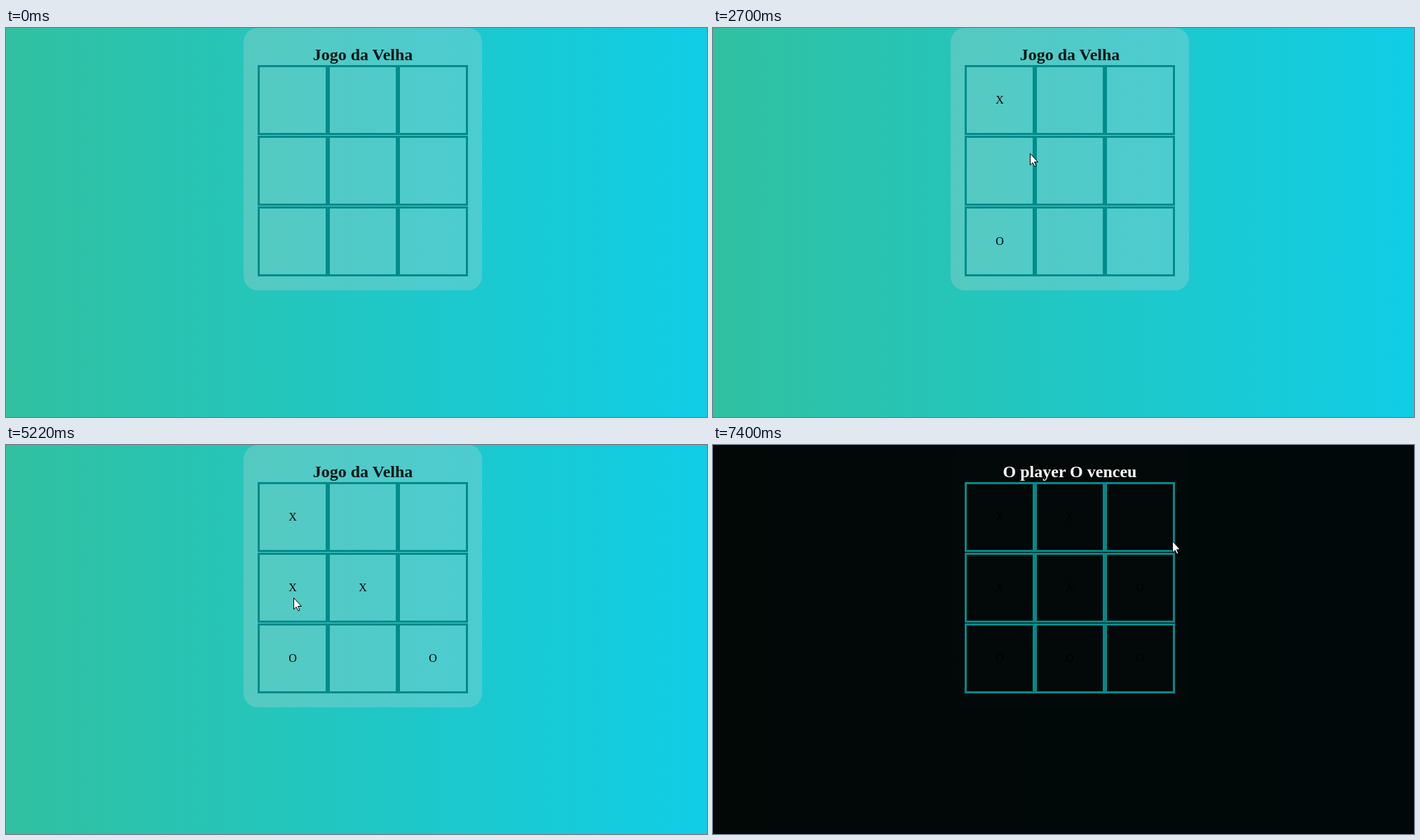
An HTML page for the animation above (8000 ms loop, 1000 px wide and 556 px high).

```html
<!DOCTYPE html>
<html lang="pt">
<head>
<meta charset="utf-8">
<title>Jogo da Velha</title>
<style>
  html, body { margin: 0; height: 100%; overflow: hidden; }
  svg { display: block; width: 100vw; height: 100vh; }
  text { font-family: "Liberation Serif", "Times New Roman", serif; font-size: 16px; text-anchor: middle; }
  #title { font-size: 24px; font-weight: bold; }
  .cell { fill: none; stroke: #008b8b; stroke-width: 3; }
</style>
</head>
<body>
<svg viewBox="0 0 1000 556" preserveAspectRatio="none">
  <defs>
    <linearGradient id="sky">
      <stop offset="0" stop-color="#31c1a1"/>
      <stop offset="1" stop-color="#10cde6"/>
    </linearGradient>
  </defs>
  <rect width="1000" height="556" fill="url(#sky)"/>
  <rect x="339" y="0" width="340" height="375" rx="20" fill="#d3d3d3" fill-opacity=".27"/>
  <rect id="shade" width="1000" height="556" fill="#000" opacity=".96"/>
  <text id="title" x="509" y="46"></text>
  <g id="board"></g>
  <path id="arrow" d="M.5 .5V17L4 13.5L7 19L9 18L6.5 12.5H11.5Z" fill="#fff" stroke="#000"/>
  <path id="beam" d="M-3 -7.5H3M-3 7.5H3M0 -7.5V7.5" fill="none" stroke="#123"/>
</svg>
<script>
const LOOP = 8000, STEP = 70, WIN = 7400;
const $ = id => document.getElementById(id);

// Cell taken at each time; X and O alternate
const moves = [[0, 1690], [6, 2200], [4, 3790], [8, 4290], [3, 4990], [5, 5490], [1, 6900], [7, WIN]];

// Pointer trips: start time, then [step, x, y]; each begins where the last one ended
const trips = [
  [580, [1, 674, 540], [3, 523, 347]],
  [910, [5, 463, 241], [7, 435, 152], [10, 415, 116]],
  [1690, [9, 441, 131]],
  [2700, [1, 452, 179], [3, 475, 184], [8, 526, 131]],
  [3390, [4, 498, 200], [6, 500, 208], [10, 667, 210]],
  [4620, [3, 490, 213], [5, 398, 214], [8, 410, 218]],
  [5490, [4, 600, 216], [5, 606, 202]],
  [6240, [2, 590, 172], [3, 556, 138], [6, 520, 115], [11, 605, 133]],
  [7070, [2, 655, 137]]
];

function add(tag, attrs) {
  const el = document.createElementNS('http://www.w3.org/2000/svg', tag);
  for (const k in attrs) el.setAttribute(k, attrs[k]);
  return $('board').appendChild(el);
}

const marks = [];
for (let i = 0; i < 9; i++) {
  const x = 359 + i % 3 * 100, y = 53 + Math.floor(i / 3) * 101;
  add('rect', { class: 'cell', x: x + 1.5, y: y + 1.5, width: 97, height: 97 });
  marks.push(add('text', { x: x + 50, y: y + 55 }));
}

function pointer(t) {
  let pos = null;
  for (const [start, ...path] of trips) {
    if (t < start) break;
    const step = Math.floor((t - start) / STEP) + 1;
    let from = 0;
    for (const [to, x, y] of path) {
      if (step <= from) break;
      const u = Math.min(1, (step - from) / (to - from));
      const [px, py] = pos || [x, y];
      pos = [px + (x - px) * u, py + (y - py) * u];
      from = to;
    }
  }
  return pos && pos.map(Math.round);
}

function show(el, on) { el.style.display = on ? '' : 'none'; }

function draw(t) {
  const won = t >= WIN;
  show($('shade'), won);
  $('title').textContent = won ? 'O player O venceu' : 'Jogo da Velha';
  $('title').setAttribute('fill', won ? '#fff' : '#031616');
  moves.forEach(([cell, at], i) => marks[cell].textContent = t >= at ? 'XO'[i % 2] : '');

  const pos = pointer(t), overText = t >= 5770 && t < 6240;
  show($('arrow'), pos && !overText);
  show($('beam'), pos && overText);
  if (pos) {
    $('arrow').setAttribute('transform', `translate(${pos})`);
    $('beam').setAttribute('transform', `translate(${pos[0] + .5} ${pos[1]})`);
  }
}

const begin = performance.now();
function tick() {
  draw((performance.now() - begin) % LOOP);
  requestAnimationFrame(tick);
}
tick();
</script>
</body>
</html>
```
